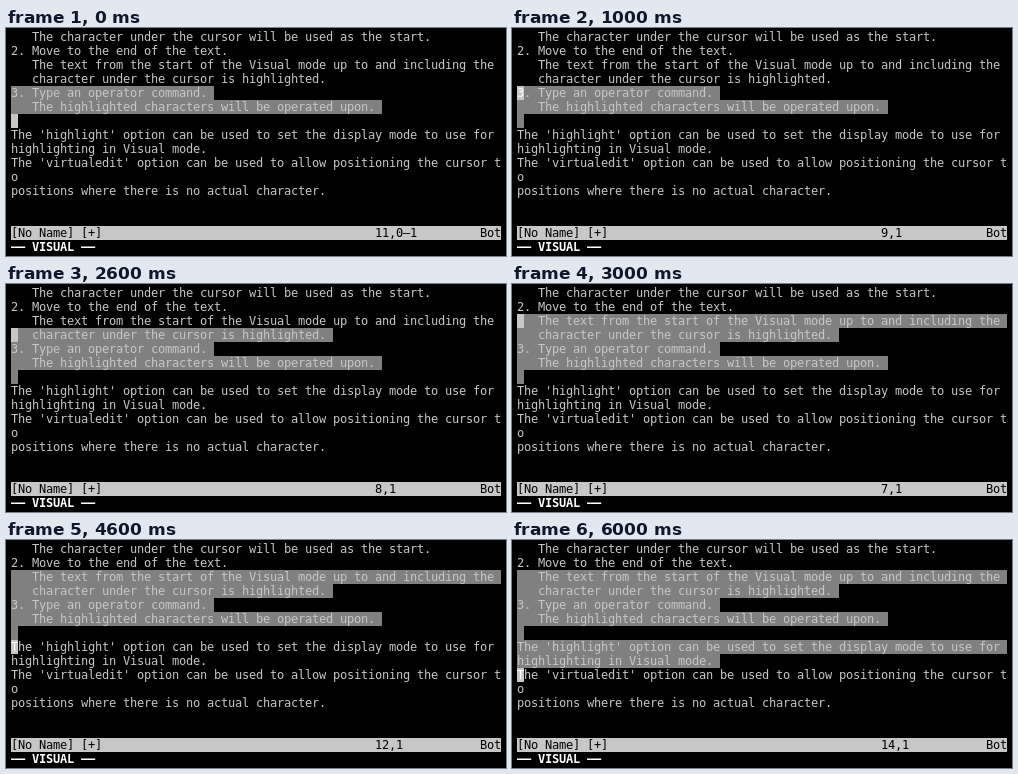
An HTML page with a canvas that plays this animation: 500 px wide and 228 px high, repeating every 7 s.

```html
<!DOCTYPE html>
<html lang="en">
<head>
<meta charset="utf-8">
<style>
html, body { margin: 0; width: 100%; height: 100%; overflow: hidden; background: #000; }
canvas { display: block; }
</style>
</head>
<body>
<canvas id="terminal" width="500" height="228"></canvas>
<script>
const ctx = document.getElementById('terminal').getContext('2d');
const CELL = 7, LINE = 14, LEFT = 5, TOP = 2;
const LIGHT = '#c7c7c7', SELECTED = '#808080';

const lines = [
  '   The character under the cursor will be used as the start.',
  '2. Move to the end of the text.',
  '   The text from the start of the Visual mode up to and including the',
  '   character under the cursor is highlighted.',
  '3. Type an operator command.',
  '   The highlighted characters will be operated upon.',
  '',
  "The 'highlight' option can be used to set the display mode to use for",
  'highlighting in Visual mode.',
  "The 'virtualedit' option can be used to allow positioning the cursor t",
  'o',
  'positions where there is no actual character.'
];

// One step per second: cursor row, first and last selected row, ruler text
const steps = [
  [6, 4, 5, '11,0–1'],
  [4, 4, 6, '9,1'],
  [3, 3, 6, '8,1'],
  [2, 2, 6, '7,1'],
  [7, 2, 6, '12,1'],
  [8, 2, 7, '13,1'],
  [9, 2, 8, '14,1']
];

function fillCells(row, columns, color) {
  ctx.fillStyle = color;
  ctx.fillRect(LEFT, TOP + row * LINE, columns * CELL, LINE);
}

function print(row, column, text, color, weight = 'normal') {
  ctx.font = `${weight} 12px "DejaVu Sans Mono", monospace`;
  ctx.fillStyle = color;
  [...text].forEach((char, i) =>
    ctx.fillText(char, LEFT + (column + i) * CELL, TOP + row * LINE + 11));
}

function draw(step) {
  const [cursor, first, last, ruler] = steps[step];
  ctx.fillStyle = '#000';
  ctx.fillRect(0, 0, 500, 228);

  lines.forEach((text, row) => {
    if (row >= first && row <= last) fillCells(row, text.length + 1, SELECTED);
    if (row === cursor) {
      fillCells(row, 1, LIGHT);
      print(row, 0, text.slice(0, 1), '#fff');
      print(row, 1, text.slice(1), LIGHT);
    } else {
      print(row, 0, text, LIGHT);
    }
  });

  fillCells(14, 70, LIGHT);
  print(14, 0, '[No Name] [+]', '#000');
  print(14, 52, ruler, '#000');
  print(14, 67, 'Bot', '#000');
  print(15, 0, '–– VISUAL ––', '#fff', 'bold');
}

function tick() {
  draw(Math.floor(performance.now() / 1000) % steps.length);
  requestAnimationFrame(tick);
}
tick();
</script>
</body>
</html>
```
